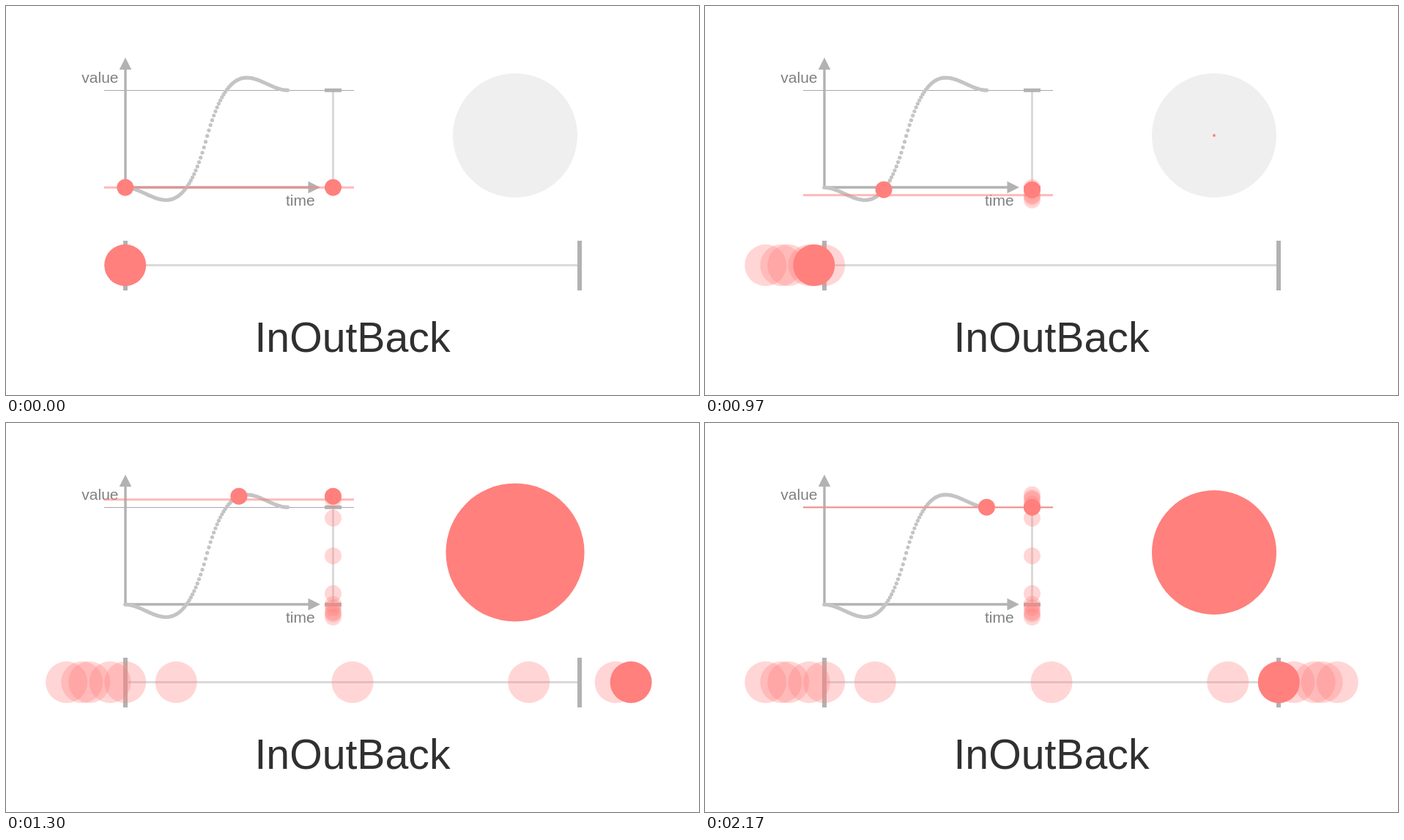
Recreate the animation shown at these times as an HTML page. Size 946 px wide and 532 px high, loop 2910 ms.

```html
<!DOCTYPE html>
<html lang="en">
<head>
<meta charset="utf-8">
<title>InOutBack</title>
<style>
  html, body { margin: 0; width: 100%; height: 100%; overflow: hidden; background: #fff; }
  svg { display: block; width: 100vw; height: 100vh; }
  text { font-family: "Liberation Sans", Arial, sans-serif; }
  .label { font-size: 21px; fill: #808080; }
  .ghost { fill: #ff807d; fill-opacity: .32; }
  .ball { fill: #ff807d; }
</style>
</head>
<body>
<svg viewBox="0 0 946 532">
  <rect width="946" height="532" fill="#fff"/>
  <circle cx="695" cy="177" r="85" fill="#efefef"/>
  <circle id="disc" class="ball" cx="695" cy="177" r="0"/>

  <rect x="134" y="115" width="341" height="1" fill="#a8a8a8"/>
  <path d="M446.5 115V248M163 354.5H783" stroke="#dadada" stroke-width="3"/>
  <path d="M435 115.3H458M435 248.3H458" stroke="#b2b2b2" stroke-width="5"/>
  <path d="M163 321V389M783 321V389" stroke="#b2b2b2" stroke-width="6"/>
  <path d="M163 86V249.7M161.3 248H414" stroke="#b2b2b2" stroke-width="3.4"/>
  <path d="M163 70.5L171.3 87H154.7ZM429 248L412.5 256.3V239.7Z" fill="#b2b2b2"/>
  <g id="curve" fill="#c4c4c4"></g>
  <text class="label" x="103.3" y="105">value</text>
  <text class="label" x="382" y="273.3">time</text>
  <text x="473" y="472.5" font-size="57.2" text-anchor="middle" fill="#303030">InOutBack</text>

  <rect id="level" x="134" width="341" height="3" fill="#ff807d" fill-opacity=".55"/>
  <g id="ghosts"></g>
  <circle id="plotDot" class="ball" r="11.5"/>
  <circle id="sideDot" class="ball" cx="446.5" r="11.5"/>
  <circle id="slider" class="ball" cy="354.5" r="28.5"/>
</svg>
<script>
  const LOOP = 2910, START = 18, STEPS = 30, GHOSTS = 12, DOTS = 100;
  const S = 1.70158 * 1.8;
  const $ = id => document.getElementById(id);

  const back = x => x * x * ((S + 1) * x - S) / 2;
  const ease = p => p < .5 ? back(2 * p) : 1 - back(2 - 2 * p);
  const clamp = p => Math.min(1, Math.max(0, p));

  const plotX = p => 162.8 + 221.6 * p;
  const plotY = v => 248.2 - 133 * v;
  const slideX = v => 162.7 + 620.6 * v;

  function set(el, attrs) {
    for (const k in attrs) el.setAttribute(k, attrs[k]);
    return el;
  }

  function circle(parent, attrs) {
    const el = document.createElementNS("http://www.w3.org/2000/svg", "circle");
    return parent.appendChild(set(el, attrs));
  }

  for (let i = 0; i < DOTS; i++) {
    const p = i / (DOTS - 1);
    circle($("curve"), { cx: plotX(p), cy: plotY(ease(p)), r: 2.6 });
  }

  const ghosts = [];
  for (let i = 0; i <= GHOSTS; i++) {
    const v = ease(i / GHOSTS);
    ghosts.push([
      circle($("ghosts"), { class: "ghost", cx: 446.5, cy: plotY(v), r: 11.5 }),
      circle($("ghosts"), { class: "ghost", cx: slideX(v), cy: 354.5, r: 28.5 })
    ]);
  }

  function draw(ms) {
    // Motion is sampled 30 times a second, on a 10 ms clock.
    const tick = Math.floor((Math.floor(ms / 10) * 10 + 5) * .03);
    const p = clamp((tick - START) / STEPS);
    const late = clamp((tick - START - 1) / STEPS);
    const v = ease(p);

    set($("disc"), { r: 85 * Math.abs(v) });
    set($("plotDot"), { cx: plotX(p), cy: plotY(v) });
    set($("sideDot"), { cy: plotY(v) });
    set($("slider"), { cx: slideX(v) });
    // The level line and the trail follow one step behind.
    set($("level"), { y: plotY(ease(late)) - 1.5 });
    ghosts.forEach((pair, i) => {
      const shown = late > 0 && late + 1e-6 >= i / GHOSTS;
      for (const el of pair) set(el, { visibility: shown ? "visible" : "hidden" });
    });
  }

  const begin = performance.now();
  function loop() {
    draw((performance.now() - begin) % LOOP);
    requestAnimationFrame(loop);
  }
  loop();
</script>
</body>
</html>
```
